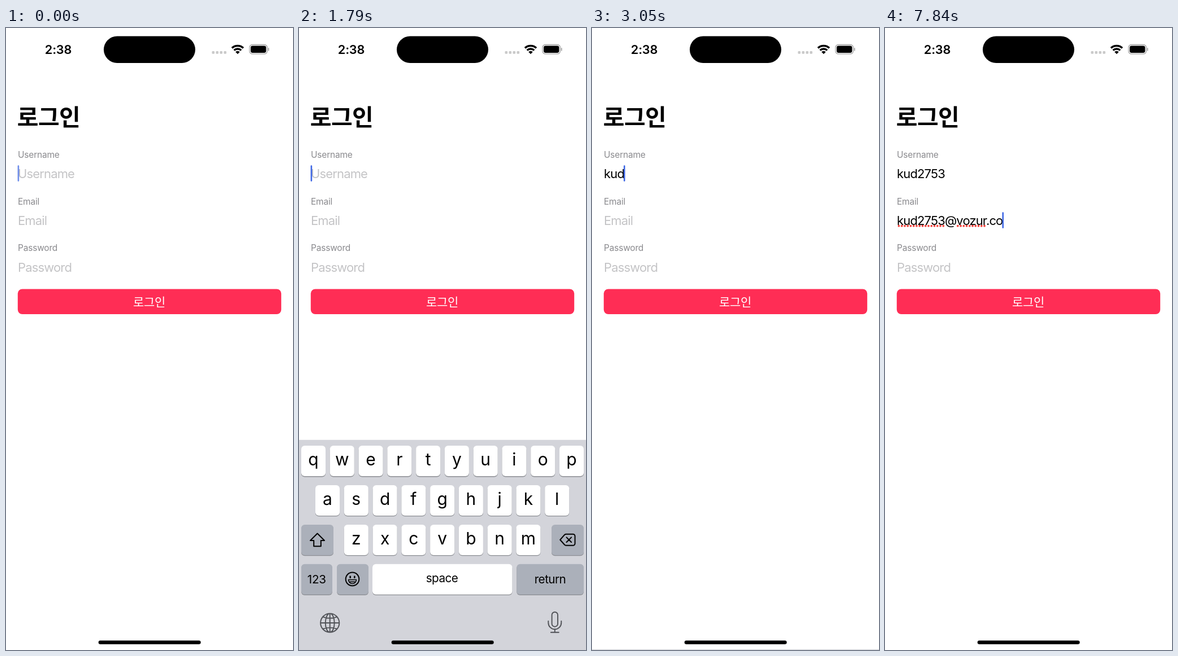
An HTML page with a canvas that plays this animation: 508x1102 px, repeating every 8000 ms.

```html
<!DOCTYPE html>
<html lang="ko">
<head>
<meta charset="utf-8">
<title>로그인</title>
<style>
html, body { margin: 0; width: 100%; height: 100%; overflow: hidden; background: #fff; }
canvas { display: block; width: 508px; height: 1102px; }
</style>
</head>
<body>
<canvas id="stage"></canvas>
<script>
const W = 508, H = 1102, LOOP = 8000, FPS = 19;
const canvas = document.getElementById('stage');
const ctx = canvas.getContext('2d');
const dpr = window.devicePixelRatio || 1;
canvas.width = W * dpr;
canvas.height = H * dpr;

const LATIN = 'Inter, Roboto, sans-serif';
const HANGUL = '"Noto Sans CJK KR", "Noto Sans CJK", "Noto Sans CJK JP", sans-serif';
const BODY = { size: 22, spacing: -0.85 };
const KEYBOARD_TOP = 726;
const OPEN_AT = 1431, CLOSE_AT = 2620.5;
const FOCUS_EMAIL = 3790;

const USER = 'kud2753';
const HOST = 'vozur';
const EMAIL = `${USER}@${HOST}.co`;
const USER_TIMES = [2630, 2790, 2950, 3420, 3470, 3520, 3580];
const EMAIL_TIMES = [4050, 4160, 4320, 4580, 4630, 4740, 4890, 5530,
  6050, 6110, 6630, 6840, 7000, 7640, 7740, 7840];

// Caret opacity: [time, alpha]
const CARET = [[0, .75], [40, .75], [110, 0], [560, 0], [680, 1], [940, 1], [1110, 0],
  [1400, 0], [1580, 1], [1940, 1], [2110, 0], [2300, 0], [2470, 1],
  [5410, 1], [5529, .3], [5530, 1], [7520, 1], [7639, .3], [7640, 1], [LOOP + 100, 1]];

function track(points, t) {
  const i = Math.max(1, points.findIndex(p => p[0] > t));
  const [t0, a] = points[i - 1], [t1, b] = points[i];
  return a + (b - a) * (t - t0) / (t1 - t0);
}

// Critically damped spring, 0 to 1
function spring(ms) {
  const x = Math.max(0, ms) * 0.0183;
  return 1 - (1 + x) * Math.exp(-x);
}

const typed = (text, times, t) => text.slice(0, times.filter(at => at <= t).length);

function setFont({ size, weight = 400, spacing = 0, family = LATIN }) {
  ctx.font = `${weight} ${size}px ${family}`;
  ctx.letterSpacing = spacing + 'px';
}

function text(str, x, y, color, style, align = 'left') {
  setFont(style);
  ctx.textAlign = align;
  ctx.fillStyle = color;
  ctx.fillText(str, x, y);
}

function widthOf(str) {
  setFont(BODY);
  return ctx.measureText(str).width;
}

function box(x, y, w, h, r, color) {
  ctx.fillStyle = color;
  ctx.beginPath();
  ctx.roundRect(x, y, w, h, r);
  ctx.fill();
}

function line(color, width, draw) {
  ctx.strokeStyle = color;
  ctx.lineWidth = width;
  ctx.lineCap = ctx.lineJoin = 'round';
  ctx.beginPath();
  draw();
  ctx.stroke();
}

function poly(points, close) {
  points.forEach(([x, y], i) => i ? ctx.lineTo(x, y) : ctx.moveTo(x, y));
  if (close) ctx.closePath();
}

function wifi(cx, cy) {
  const mid = -Math.PI / 2, half = 0.75;
  ctx.fillStyle = '#000';
  for (const [inner, outer] of [[0, 5.6], [7.6, 11], [13, 16.5]]) {
    ctx.beginPath();
    ctx.arc(cx, cy, outer, mid - half, mid + half);
    ctx.arc(cx, cy, inner, mid + half, mid - half, true);
    ctx.fill();
  }
}

function statusBar() {
  text('2:38', 92.5, 46, '#000', { size: 21.7, weight: 600, spacing: -0.2 }, 'center');
  box(173, 14.5, 162, 47.5, 23.75, '#000');
  for (let i = 0; i < 4; i++) box(364.5 + i * 7, 41, 4.6, 4.8, 1.4, '#cacaca');
  wifi(410, 46.3);
  line('#a0a0a0', 1.3, () => ctx.roundRect(431, 29.5, 31.4, 16.4, 5));
  box(433, 31.4, 27.4, 12.6, 3.4, '#000');
  box(463.8, 35, 1.8, 5.6, 1, '#a0a0a0');
}

function dots(x0, x1, y) {
  ctx.fillStyle = '#f4403a';
  for (let x = x0 + 2; x <= x1 - 1; x += 5.25) {
    ctx.beginPath();
    ctx.arc(x, y, 1.85, 0, Math.PI * 2);
    ctx.fill();
  }
}

function field(label, value, y) {
  text(label, 21, y - 36.5, '#8a8a8e', { size: 15.5, spacing: -0.2 });
  text(value || label, 21, y, value ? '#000' : '#c4c4c6', BODY);
}

function form(t) {
  text('로그인', 19.8, 173, '#000', { size: 41, weight: 700, spacing: -0.6, family: HANGUL });
  const user = typed(USER, USER_TIMES, t);
  const email = typed(EMAIL, EMAIL_TIMES, t);
  field('Username', user, 266);
  field('Email', email, 349);
  field('Password', '', 431.5);

  const hostX = 21 + widthOf(USER + '@');
  if (t >= 5580) dots(22.5, 21 + widthOf(USER) - 1, 350.7);
  if (t >= 7690) dots(hostX + 0.5, hostX + widthOf(HOST) - 1, 350.7);

  const inEmail = t >= FOCUS_EMAIL;
  const caretX = 20.6 + Math.max(0, widthOf(inEmail ? email : user) - 0.6);
  ctx.globalAlpha = track(CARET, t);
  box(caretX, inEmail ? 326.3 : 243.3, 2.6, 28.6, 1.3, '#3e67e4');
  ctx.globalAlpha = 1;

  box(20.8, 462.5, 466.4, 44.5, 8, '#ff2d55');
  text('로그인', 253.5, 492.5, '#fff', { size: 21, spacing: -0.3, family: HANGUL }, 'center');
}

function key(x, y, w, color = '#fff') {
  box(x, y + 1.4, w, 54, 6, '#8c8e93');
  box(x, y, w, 54, 6, color);
}

function letters(row, x, y) {
  [...row].forEach((ch, i) => {
    const left = x + i * 50.78;
    key(left, y, 43);
    text(ch, left + 21.5, y + 34.7, '#000', { size: 30 }, 'center');
  });
}

function shiftIcon(x, y) {
  line('#000', 2, () => poly([[x, y - 11.5], [x + 12.5, y + 1], [x + 6.3, y + 1],
    [x + 6.3, y + 11.3], [x - 6.3, y + 11.3], [x - 6.3, y + 1], [x - 12.5, y + 1]], true));
}

function deleteIcon(x, y) {
  line('#000', 2, () => {
    ctx.moveTo(x - 13.3, y);
    ctx.lineTo(x - 5.5, y - 8.8);
    ctx.arcTo(x - 4, y - 10, x, y - 10, 3);
    ctx.arcTo(x + 13, y - 10, x + 13, y, 3.5);
    ctx.arcTo(x + 13, y + 10, x, y + 10, 3.5);
    ctx.arcTo(x - 4, y + 10, x - 5.5, y + 8.8, 3);
    ctx.lineTo(x - 5.5, y + 8.8);
    ctx.closePath();
    poly([[x - 2, y - 4.3], [x + 6.6, y + 4.3]]);
    poly([[x + 6.6, y - 4.3], [x - 2, y + 4.3]]);
  });
}

function smileIcon(x, y) {
  line('#000', 2, () => ctx.arc(x, y, 11.8, 0, Math.PI * 2));
  for (const side of [-3.8, 3.8]) box(x + side - 1.3, y - 6, 2.6, 4.6, 1.3, '#000');
  line('#000', 1.5, () => {
    ctx.arc(x, y + 1.2, 7, 0, Math.PI);
    ctx.closePath();
    poly([[x - 5.5, y + 4.8], [x + 5.5, y + 4.8]]);
  });
}

function globeIcon(x, y) {
  line('#505257', 1.9, () => {
    ctx.arc(x, y, 16.6, 0, Math.PI * 2);
    ctx.moveTo(x + 8, y);
    ctx.ellipse(x, y, 8, 16.6, 0, 0, Math.PI * 2);
    poly([[x, y - 16.6], [x, y + 16.6]]);
    poly([[x - 16.6, y], [x + 16.6, y]]);
    for (const s of [-1, 1]) {
      ctx.moveTo(x - 12.6, y + s * 10.7);
      ctx.quadraticCurveTo(x, y + s * 6, x + 12.6, y + s * 10.7);
    }
  });
}

function micIcon(x, y) {
  line('#505257', 1.9, () => {
    ctx.roundRect(x - 5.2, y - 19, 10.4, 26, 5.2);
    ctx.moveTo(x + 11.5, y - 3);
    ctx.lineTo(x + 11.5, y);
    ctx.arc(x, y, 11.5, 0, Math.PI);
    ctx.lineTo(x - 11.5, y - 3);
    poly([[x, y + 11.5], [x, y + 17]]);
    poly([[x - 7, y + 17], [x + 7, y + 17]]);
  });
}

function keyboard(t) {
  const shown = t < CLOSE_AT ? spring(t - OPEN_AT) : 1 - spring(t - CLOSE_AT);
  if (shown < 0.001) return;
  const gray = '#abb0ba';
  const label = { size: 20.7, spacing: -0.55 };
  ctx.save();
  ctx.translate(0, (H - KEYBOARD_TOP) * (1 - shown));
  ctx.fillStyle = '#d3d4da';
  ctx.fillRect(0, KEYBOARD_TOP, W, H);

  letters('qwertyuiop', 4, 736.3);
  letters('asdfghjkl', 29, 806.2);
  letters('zxcvbnm', 79.8, 876.2);
  key(4, 876.2, 57, gray);
  key(447, 876.2, 57, gray);
  key(4, 946, 55, gray);
  key(67, 946, 56, gray);
  key(130, 946, 247.5);
  key(385.3, 946, 118.7, gray);

  shiftIcon(32.5, 903.3);
  deleteIcon(475.5, 903);
  smileIcon(94.5, 972.7);
  text('123', 31.3, 980, '#000', { size: 20.7, spacing: -0.2 }, 'center');
  text('space', 253, 978, '#000', label, 'center');
  text('return', 444.5, 980, '#000', label, 'center');
  globeIcon(54.7, 1050.3);
  micIcon(452.8, 1050);
  ctx.restore();
}

function stepped(ms) {
  return Math.floor(ms * FPS / 1000 + 0.1) * 1000 / FPS + 5;
}

function frame() {
  const t = stepped(performance.now() % LOOP);
  ctx.setTransform(dpr, 0, 0, dpr, 0, 0);
  ctx.fillStyle = '#fff';
  ctx.fillRect(0, 0, W, H);
  statusBar();
  form(t);
  keyboard(t);
  box(163.7, 1085.3, 181, 6.4, 3.2, '#000');
  requestAnimationFrame(frame);
}
frame();
</script>
</body>
</html>
```
